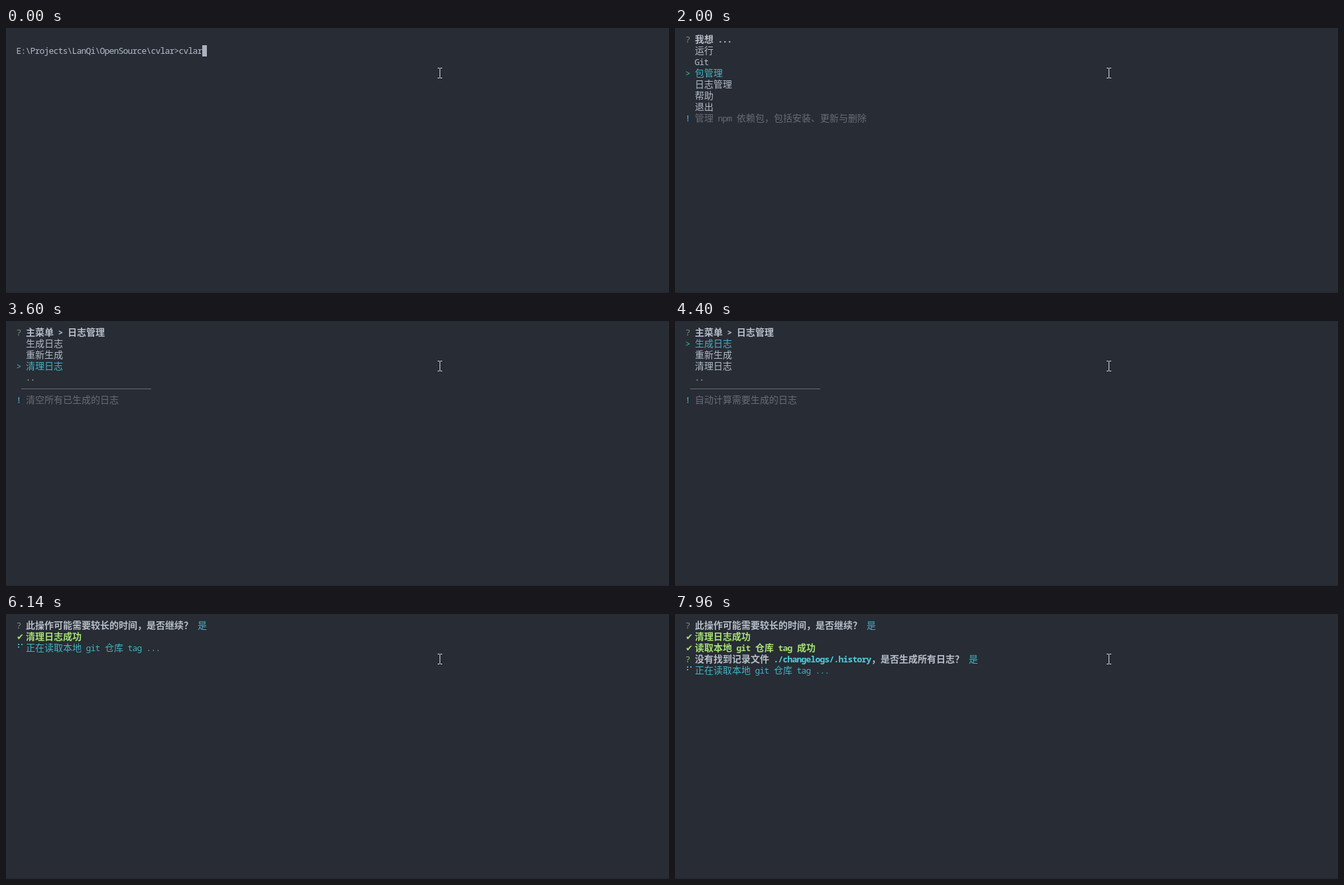
These frames come from a looping animation (1000 by 400 pixels, 8 s). An HTML page:

```html
<!DOCTYPE html>
<html lang="zh-CN">
<head>
<meta charset="utf-8">
<title>cvlar</title>
<style>
html, body { margin: 0; width: 100%; height: 100%; overflow: hidden; background: #282c34; }
#stage { position: relative; width: 1000px; height: 400px; overflow: hidden; }
#stage::after { content: ""; position: absolute; left: 0; bottom: 0; width: 100%; height: 2px; background: #252830; }
.scene { position: absolute; inset: 0; visibility: hidden; }
.scene.on { visibility: visible; }
.scene span, .scene i { position: absolute; }
.scene span { white-space: pre; line-height: 18px; color: #b2bcc8; }
.latin { font: 13px "Noto Sans Mono", monospace; letter-spacing: -.8px; margin: -1px 0 0 -.4px; }
.cjk { font: 14px "Noto Sans CJK SC", "Noto Sans CJK", sans-serif; margin-top: -2px; }
.mark { font: 13px "DejaVu Sans", sans-serif; }
.scene .bold { font-weight: bold; color: #b6bec8; }
.scene .dim { color: #676c76; }
.scene .cyan { color: #42b3c2; }
.scene .path { font-weight: bold; color: #4cd1e0; }
.scene .ok { font-weight: bold; color: #a5e075; }
.scene .ask { color: #8cc265; }
.scene .asked { color: #858d7d; }
.scene .info { color: #4ab8dc; }
.cursor { width: 7px; height: 17px; background: #abb2bf; }
.rule { height: 1px; background: #676c76; }
.dot { width: 2px; height: 2px; background: #42b3c2; }
#mouse { position: absolute; left: 651px; top: 60px; }
</style>
</head>
<body>
<div id="stage">
  <svg id="mouse" width="7" height="16" shape-rendering="crispEdges">
    <path d="M0 .5H3M4 .5H7M3.5 1V15M0 15.5H3M4 15.5H7" fill="none" stroke="#d8dade"/>
  </svg>
</div>
<script>
const LOOP = 8000, LEFT = 16, TOP = 9, CELL = 7, LINE = 17;
const stage = document.getElementById("stage");
const HINT = "(Use arrow keys)";
const x = col => LEFT + col * CELL;
const y = row => TOP + row * LINE;
const isWide = s => /[\u3000-\uffef]/.test(s);
const columns = s => [...s].reduce((n, c) => n + (isWide(c) ? 2 : 1), 0);

function add(scene, tag, cls, left, top) {
  const el = document.createElement(tag);
  el.className = cls;
  el.style.left = left + "px";
  el.style.top = top + "px";
  return scene.appendChild(el);
}

// Writes one string on the cell grid and returns the column after it.
function write(scene, row, col, text, style = "") {
  for (const run of text.match(/[\u3000-\uffef]+|✔|[^\u3000-\uffef✔]+/g)) {
    const font = isWide(run) ? "cjk" : run === "✔" ? "mark" : "latin";
    add(scene, "span", font + " " + style, x(col), y(row)).textContent = run;
    col += columns(run);
  }
  return col;
}

const cursor = (s, row, col) => add(s, "i", "cursor", x(col), y(row));

function title(s, row, parts, tail, tailStyle, markStyle = "asked") {
  write(s, row, 0, "?", markStyle);
  let col = 2;
  for (const [text, style] of parts) col = write(s, row, col, text, style);
  if (tail) write(s, row, col + 1, tail, tailStyle);
}

function choices(s, row, items, picked) {
  items.forEach((item, i) => {
    if (i === picked) write(s, row + i, 0, ">", "cyan");
    write(s, row + i, 2, item, i === picked ? "cyan" : "");
  });
}

function note(s, row, text) {
  write(s, row, 0, "!", "info");
  write(s, row, 2, text, "dim");
}

function done(s, row, text) {
  write(s, row, 0, "✔", "ok");
  write(s, row, 2, text, "ok");
}

// Braille spinner: bits 0-2 are the left dots, 3-5 the right dots.
const SPIN = [..."⠋⠙⠹⠸⠼⠴⠦⠧⠇⠏"].map(c => c.charCodeAt(0) - 0x2800);

function reading(s, row, step) {
  const bits = SPIN[step % SPIN.length];
  for (let b = 0; b < 6; b++)
    if (bits >> b & 1) add(s, "i", "dot", b < 3 ? 18 : 23, y(row) + 2 + b % 3 * 4);
  write(s, row, 2, "正在读取本地 git 仓库 tag ...", "cyan");
}

function prompt(s) {
  write(s, 1, 0, "E:\\Projects\\LanQi\\OpenSource\\cvlar>cvlar");
}

const MAIN = ["运行", "Git", "包管理", "日志管理", "帮助", "退出"];
const MAIN_NOTES = ["选择要运行的脚本", "选择 Git 相关操作", "管理 npm 依赖包，包括安装、更新与删除"];
function mainMenu(s, picked, hint) {
  title(s, 0, [["我想 ...", "bold"]], hint && HINT, "dim");
  choices(s, 1, MAIN, picked);
  if (MAIN_NOTES[picked]) note(s, 7, MAIN_NOTES[picked]);
}

const LOGS = ["生成日志", "重新生成", "清理日志", ".."];
const LOG_NOTES = ["自动计算需要生成的日志", "清空已有日志并重新生成所有日志，可能需要较长时间", "清空所有已生成的日志"];
function logMenu(s, picked, hint) {
  title(s, 0, [["主菜单 > 日志管理", "bold"]], hint && HINT, "dim");
  choices(s, 1, LOGS, picked);
  add(s, "i", "rule", x(1), y(5) + 8).style.width = 28 * CELL + "px";
  note(s, 6, LOG_NOTES[picked]);
}

const YES_NO = ["是", "否"];
const confirmTitle = (s, tail, style) =>
  title(s, 0, [["此操作可能需要较长的时间，是否继续？", "bold"]], tail, style);

function confirmed(s) {
  confirmTitle(s, "是", "cyan");
  done(s, 1, "清理日志成功");
}

function history(s, tail, style) {
  confirmed(s);
  done(s, 2, "读取本地 git 仓库 tag 成功");
  title(s, 3, [["没有找到记录文件 ", "bold"], ["./changelogs/.history", "path"],
    ["，是否生成所有日志？", "bold"]], tail, style, "ask");
}

function finalRead(s, step) {
  history(s, "是", "cyan");
  reading(s, 4, step);
}

const steps = [
  [0, s => { prompt(s); cursor(s, 1, 40); }],
  [400, s => { prompt(s); cursor(s, 2, 0); }],
  [800, s => cursor(s, 0, 0)],
  [1200, s => mainMenu(s, 0, true)],
  [1600, s => mainMenu(s, 1)],
  [2000, s => mainMenu(s, 2)],
  [2400, s => mainMenu(s, 3)],
  [2800, s => logMenu(s, 0, true)],
  [3200, s => logMenu(s, 1)],
  [3600, s => logMenu(s, 2)],
  [4000, s => logMenu(s, 1)],
  [4400, s => logMenu(s, 0)],
  [4800, s => reading(s, 0, 0)],
  [5200, s => logMenu(s, 0, true)],
  [5270, s => logMenu(s, 1)],
  [5340, s => { confirmTitle(s, HINT, "dim"); choices(s, 1, YES_NO, 1); }],
  [5740, s => {
    confirmTitle(s);
    choices(s, 1, YES_NO, 0);
    note(s, 3, "将删除 ./changelogs 目录下所有日志文件，并重新读取本地仓库的标签记录");
  }],
  [6140, s => { confirmed(s); reading(s, 2, 0); }],
  [6540, s => {
    history(s, HINT, "dim");
    choices(s, 4, YES_NO, 0);
    note(s, 6, "将读取本地仓库所有 tag，并根据提交记录重新生成全部的日志文件");
  }],
  [6940, s => finalRead(s, 0)]
];
for (let i = 0; i < 10; i++)
  steps.push([Math.floor(7340 + i * 620 / 9), s => finalRead(s, i + 1)]);

const scenes = steps.map(([, draw]) => {
  const el = document.createElement("div");
  el.className = "scene";
  draw(el);
  stage.prepend(el);
  return el;
});

let shown = -1;
function tick() {
  const t = performance.now() % LOOP;
  const now = steps.findLastIndex(([start]) => start <= t);
  if (now !== shown) {
    if (shown >= 0) scenes[shown].classList.remove("on");
    scenes[now].classList.add("on");
    shown = now;
  }
  requestAnimationFrame(tick);
}
tick();
</script>
</body>
</html>
```
